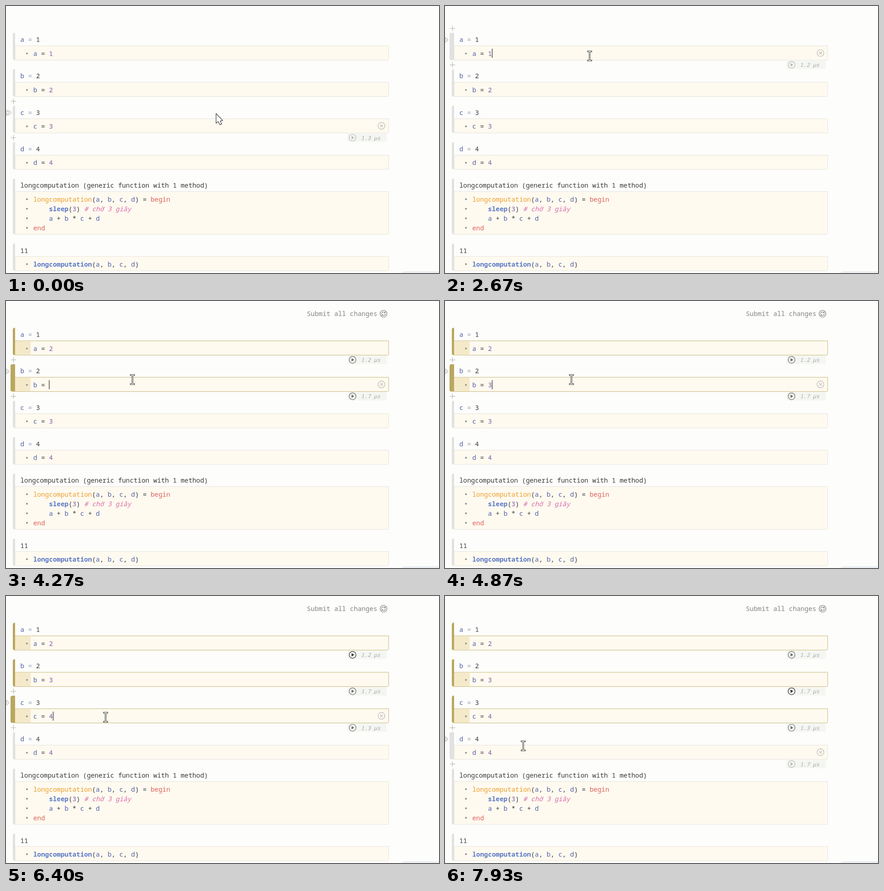
An HTML page for the animation above (8 s loop, 952x588 px).

```html
<!DOCTYPE html>
<html lang="en">
<head>
<meta charset="utf-8">
<title>Reactive notebook</title>
<style>
  html, body { margin: 0; width: 100%; height: 100%; overflow: hidden; background: #fdfdfb; }
  svg { display: block; width: 952px; height: 588px; }
  text { font: 14.33px 'Roboto Mono', 'Noto Sans Mono', 'DejaVu Sans Mono', monospace; fill: #3a3a3a; white-space: pre; }
  .var { fill: #5563a8; font-weight: 500; }
  .eq { fill: #94a3bd; }
  .num { fill: #815ba4; }
  .def { fill: #ed9f2c; }
  .key { fill: #dd6158; }
  .call { fill: #5b78c6; font-weight: 600; }
  .note { fill: #d96ba8; font-style: italic; }
  .time { font-size: 11.8px; font-style: italic; fill: #a6a6a6; }
  .submit { fill: #858585; }
  .line { fill: none; stroke-width: 1.2; }
</style>
</head>
<body>
<svg id="stage" viewBox="0 0 952 588"></svg>
<script>
const LOOP = 8000, BLINK = 530, CHAR = 8.6, FADE = 160;
const GOLD = '#b9a75f', GRAY = '#b8b8b4';
const stage = document.getElementById('stage');

const cells = [
  { name: 'a', before: 1, after: 2, time: '1.2', focus: 1600, erase: 2730, type: 3000, dark: [5990, 6700] },
  { name: 'b', before: 2, after: 3, time: '1.7', focus: 3860, erase: 4200, type: 4400, dark: [7670, LOOP] },
  { name: 'c', before: 3, after: 4, time: '1.3', focus: 5930, erase: 6130, type: 6330, dark: [0, 0] },
  { name: 'd', before: 4, after: 4, time: '1.7', focus: 7400, erase: Infinity, type: Infinity, dark: [0, 0] }
];
cells.forEach((cell, i) => cell.top = 59.1 + 80.2 * i);

// Pointer stops: time, x, y
const path = [
  [70, 468, 249], [870, 326, 92], [1000, 322, 98], [1270, 318, 110],
  [3330, 318, 110], [3860, 278, 173], [5070, 278, 173], [5470, 218, 268],
  [5600, 219, 267], [6800, 219, 267], [7380, 172, 330]
];

function pointer(t) {
  const next = path.findIndex(p => p[0] > t);
  if (next === 0) return path[0].slice(1);
  if (next < 0) return path[path.length - 1].slice(1);
  const [t0, x0, y0] = path[next - 1], [t1, x1, y1] = path[next];
  const u = (t - t0) / (t1 - t0), k = u * u * (3 - 2 * u);
  return [x0 + (x1 - x0) * k, y0 + (y1 - y0) * k];
}

// Share of the last moments that the pointer spent over the cell
function hover(cell, t) {
  let hits = 0;
  for (let i = 0; i < 8; i++) {
    const y = pointer(Math.max(0, t - i * FADE / 8))[1];
    if (y >= cell.top && y < cell.top + 80.2) hits++;
  }
  return hits / 8;
}

const span = (cls, s) => `<tspan class="${cls}">${s}</tspan>`;
const text = (x, y, s, cls = '') => `<text x="${x}" y="${y}" class="${cls}">${s}</text>`;
const rect = (x, y, w, h, fill) => `<rect x="${x}" y="${y}" width="${w}" height="${h}" fill="${fill}"/>`;
const line = (d, color) => `<path class="line" d="${d}" stroke="${color}"/>`;
const ring = (x, y, color, r = 7.5) => `<circle class="line" cx="${x}" cy="${y}" r="${r}" stroke="${color}"/>`;
const group = (opacity, s) => opacity ? `<g opacity="${opacity}">${s}</g>` : '';
const args = separators => ['a', 'b', 'c', 'd'].map((v, i) => span('var', v) + (separators[i] || '')).join('');
const argList = `(${args([', ', ', ', ', '])})`;

function frame(top, height, changed = false, focused = false) {
  const left = focused ? 10 : 15, bottom = top + height, y = top + 28.7;
  return `<path d="M20 ${top}h${left - 16}q-4 0-4 4V${bottom - 4}q0 4 4 4H20z" fill="${changed ? GOLD : '#e1e1e1'}"/>`
    + `<path d="M20 ${y}H841.3V${bottom - 3}q0 3-3 3H20z" fill="#fefaf0" stroke="${changed ? '#c3b575' : '#e6e3dc'}"/>`
    + (changed ? rect(20, y + .5, 34, height - 29.7, '#f4e9c9') : '');
}

const codeLine = (y, s) => `<circle cx="46" cy="${y}" r="1.9" fill="#8a8a86"/>` + text(60, y + 5, s);
const plus = y => line(`M10.5 ${y}h12m-6-6v12`, GRAY);

function marginTools(top, focused) {
  const x = focused ? -1.5 : 3.5, y = top + 15.5;
  return plus(top - 9.6) + plus(top + 70.5)
    + line(`M${x - 8} ${y}q8-11 16 0q-8 11-16 0z`, GRAY) + ring(x, y, GRAY, 3.2);
}

const clearButton = y => ring(825.5, y, GRAY) + line(`M822.5 ${y - 3}l6 6m0-6l-6 6`, GRAY);

function runArea(y, time, color) {
  return rect(751, y - 9, 86, 18, '#f4f6f2') + ring(762, y, color)
    + `<path d="M759.8 ${y - 3.7}l5.8 3.7-5.8 3.7z" fill="${color}"/>`
    + text(780.5, y + 4.5, time + ' µs', 'time');
}

function drawCell(cell, i, t) {
  const { name, top } = cell;
  const changed = t >= cell.erase;
  const focused = t >= cell.focus && !(cells[i + 1] && t >= cells[i + 1].focus);
  const value = t >= cell.type ? cell.after : changed ? '' : cell.before;
  const over = hover(cell, t);
  const lastInput = Math.max(...[cell.focus, cell.erase, cell.type].filter(s => s <= t));
  const caretOn = focused && Math.floor((t - lastInput) / BLINK) % 2 === 0;
  const caretX = 60 + CHAR * (4 + String(value).length);
  const dark = t >= cell.dark[0] && t < cell.dark[1];
  return group(over, marginTools(top, focused))
    + frame(top, 60.1, changed, focused)
    + text(31.5, top + 20, span('var', name) + span('eq', ' = ') + cell.before)
    + codeLine(top + 45.5, span('var', name) + ' = ' + span('num', value))
    + group(over, clearButton(top + 44.4))
    + group(changed ? 1 : over, runArea(top + 70.5, cell.time, dark ? '#303030' : changed ? '#6c6c68' : GRAY))
    + (caretOn ? rect(caretX, top + 35, 1.3, 20, '#333') : '');
}

const functionCells = frame(380, 123)
  + text(31.5, 399.5, 'longcomputation (generic function with 1 method)')
  + codeLine(425.5, span('def', 'longcomputation') + argList + ' = ' + span('key', 'begin'))
  + codeLine(446.5, '    ' + span('call', 'sleep') + '(' + span('num', 3) + ') ' + span('note', '# chờ 3 giây'))
  + codeLine(467.5, '    ' + args([' + ', ' * ', ' + ']))
  + codeLine(488.5, span('key', 'end'))
  + frame(523, 60)
  + text(31.5, 543.5, '11')
  + codeLine(568.5, span('call', 'longcomputation') + argList)
  + '<path d="M868 588l8-4h76v4z" fill="#eceff3"/>';

const submit = text(661.5, 32.7, 'Submit all changes', 'submit') + ring(830, 28, '#777')
  + line('M826 28a4 4 0 0 1 7-2.6m1 2.6a4 4 0 0 1-7 2.6M833.7 23.5v2.4h-2.4M826.3 32.5v-2.4h2.4', '#777');

function drawPointer(t) {
  const [x, y] = pointer(t);
  if (t < 70) return '<path d="M461.8 236.8v21.5l4.7-3.8 3.7 7 4-2-3.4-6 5.7-1.5z" fill="#fff" stroke="#555" stroke-width="1.4" stroke-linejoin="round"/>';
  const beam = `M${x - 3.5} ${y - 10}h7m-3.5 0v20m-3.5 0h7`;
  return `<path d="${beam}" fill="none" stroke="#5c5c58" stroke-width="3.6" stroke-linecap="square"/>`
    + `<path d="${beam}" fill="none" stroke="#f0f0ea" stroke-width="1.3"/>`;
}

function draw(now) {
  const t = now % LOOP;
  stage.innerHTML = cells.map((cell, i) => drawCell(cell, i, t)).join('') + functionCells
    + (t >= cells[0].erase ? submit : '') + drawPointer(t);
  requestAnimationFrame(draw);
}
draw(0);
</script>
</body>
</html>
```
